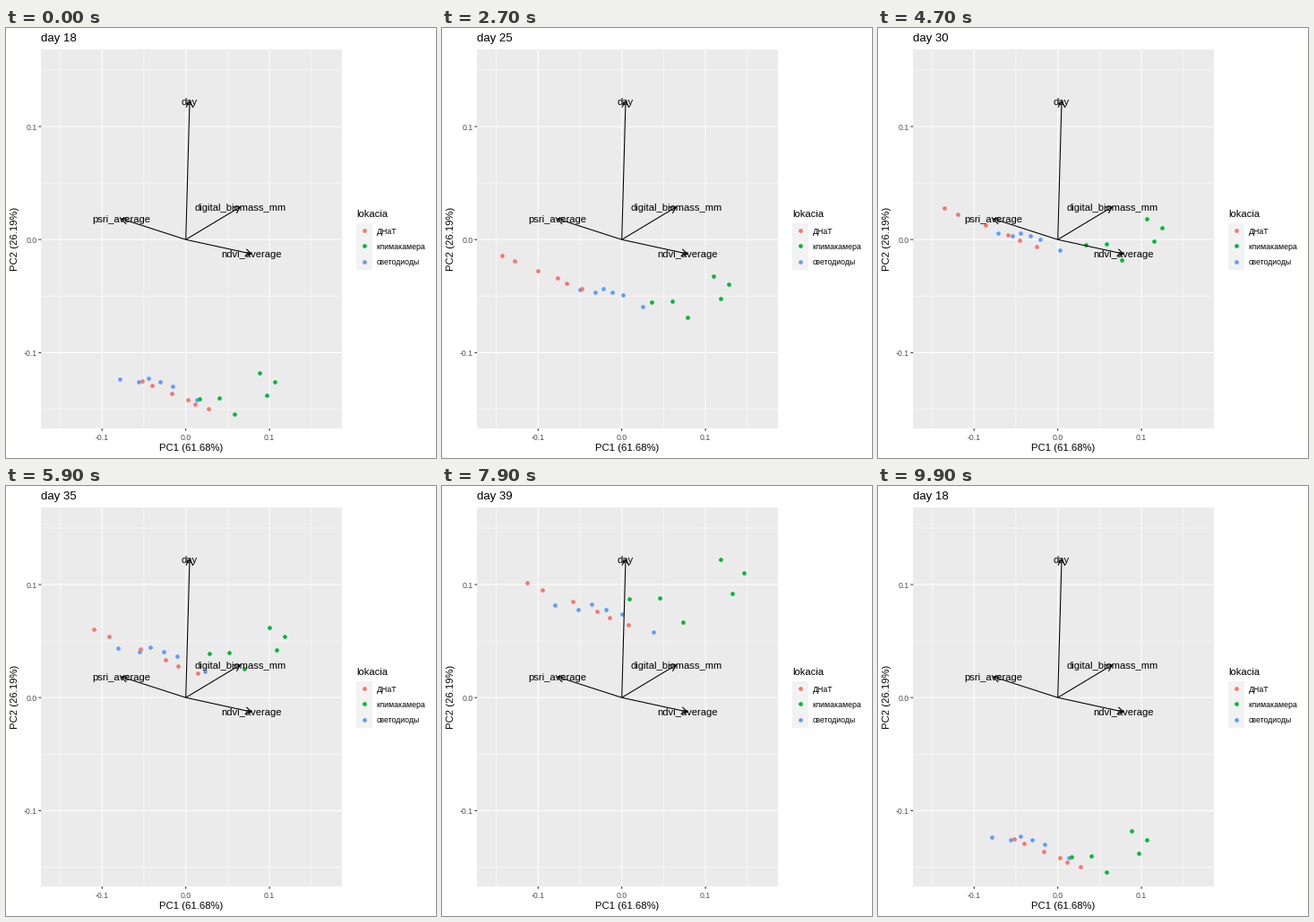
Animation, 480 px wide and 480 px high, one loop 10000 ms. Source, as a matplotlib script:

```python
import numpy as np
import matplotlib.pyplot as plt
from matplotlib.animation import FuncAnimation
from matplotlib.patches import Rectangle

plt.rcParams["font.family"] = "Liberation Sans"

SIZE, DPI = 480, 72  # at 72 dpi one point is one pixel
FRAMES = 100
LEFT, TOP, RIGHT, BOTTOM = 39.2, 24, 375, 447
RED, GREEN, BLUE = "#F8766D", "#00BA38", "#619CFF"
LINE, DOT = 1.07, 22
TEXT, SMALL, TITLE = 11.25, 8.8, 13.2

DAYS = [18, 23, 25, 28, 30, 32, 35, 37, 39, 42]
KEY_DAYS = [18, 23, 26.5, 31, 35, 39, 42]


class Cloud:
    """Six plants in a fixed formation that drifts and widens with the day."""

    def __init__(self, color, z, cx, cy, width, shape_x, shape_y):
        self.path = cx, cy, width
        self.shape = np.column_stack([shape_x, shape_y])
        self.dots = ax.scatter([], [], s=DOT, color=color, lw=0, zorder=z)

    def place(self, day):
        cx, cy, width = (np.interp(day, KEY_DAYS, p) for p in self.path)
        return (cx, cy) + width * self.shape

    def move(self, day, next_day, t):
        a, b = self.place(day), self.place(next_day)
        self.dots.set_offsets(a + (b - a) * t)


fig = plt.figure(figsize=(SIZE / DPI, SIZE / DPI), dpi=DPI, facecolor="white")
ax = fig.add_axes([0, 0, 1, 1])
ax.set_xlim(0, SIZE)
ax.set_ylim(SIZE, 0)
ax.axis("off")


def line(xs, ys, color, width, z):
    ax.plot(xs, ys, color=color, lw=width, zorder=z, snap=False,
            solid_capstyle="butt", solid_joinstyle="round")


def text(x, y, s, size=TEXT, color="black", ha="left", **kw):
    return ax.text(x, y, s, fontsize=size, color=color, ha=ha,
                   va="baseline", zorder=6, **kw)


def box(x, y, w, h, color):
    ax.add_patch(Rectangle((x, y), w, h, fc=color, ec="none", zorder=0))


def px(x):
    return 200.7 + 934 * x


def py(y):
    return 236.2 - 1262 * y


def grid(v, width):
    line([px(v)] * 2, [TOP, BOTTOM], "white", width, 1)
    line([LEFT, RIGHT], [py(v)] * 2, "white", width, 1)


def arrow(x, y, head=8):
    """Line from the origin with an open 30 degree head."""
    x0, y0 = px(0), py(0)
    line([x0, x], [y0, y], "black", LINE, 4)
    angle = np.arctan2(y0 - y, x0 - x) + np.radians([-30, 30])
    hx, hy = x + head * np.cos(angle), y + head * np.sin(angle)
    line([hx[0], x, hx[1]], [hy[0], y, hy[1]], "black", LINE, 4)


# Panel, grid and axes
box(LEFT, TOP, RIGHT - LEFT, BOTTOM - TOP, "#EBEBEB")
for v in (-0.15, -0.05, 0.05, 0.15):
    grid(v, LINE / 2)
for v in (-0.1, 0, 0.1):
    grid(v, LINE)
    line([px(v)] * 2, [BOTTOM, BOTTOM + 2.75], "#333333", LINE, 2)
    line([LEFT - 2.75, LEFT], [py(v)] * 2, "#333333", LINE, 2)
    text(px(v), 459.7, f"{v:.1f}", SMALL, "#4D4D4D", "center")
    text(34.5, py(v) + 3.5, f"{v:.1f}", SMALL, "#4D4D4D", "right")
text((LEFT + RIGHT) / 2 - 0.5, 472.4, "PC1 (61.68%)", ha="center")
text(13.3, (TOP + BOTTOM) / 2, "PC2 (26.19%)", ha="center",
     rotation=90, rotation_mode="anchor")

# Loadings
for x, y, name in [(205, 81.8, "day"), (261.3, 199.8, "digital_biomass_mm"),
                   (128.8, 213, "psri_average"), (274.2, 252.2, "ndvi_average")]:
    arrow(x, y)
    text(x, y + 4.2, name, ha="center")

# Legend
text(391, 211.3, "lokacia")
box(391.2, 217.6, 17.3, 51.9, "#F2F2F2")
for i, (name, color) in enumerate([("ДНаТ", RED), ("климакамера", GREEN),
                                   ("светодиоды", BLUE)]):
    y = 226.2 + 17.28 * i
    ax.scatter([399.8], [y], s=DOT, color=color, lw=0, zorder=3)
    text(413.8, y + 3.3, name, SMALL)

title = text(39.2, 15, "", TITLE)

# Centre and width of each location on the key days, then its formation
clouds = [
    Cloud(RED, 3.2,
          [190, 112, 111, 125, 158, 154, 143],
          [410, 315, 272.5, 222.5, 185.5, 132.5, 97],
          [74, 69, 92, 103, 116, 113, 112],
          [-0.52, -0.37, -0.07, 0.17, 0.29, 0.48],
          [-0.22, -0.15, -0.03, 0.07, 0.13, 0.20]),
    Cloud(BLUE, 3,
          [167.5, 199, 189.5, 162, 171, 177.5, 166],
          [398, 344, 298, 232.5, 188, 141, 105],
          [86, 92, 64, 65, 97, 110, 108],
          [-0.47, -0.23, -0.10, 0.05, 0.21, 0.53],
          [-0.07, -0.03, -0.08, -0.03, 0.02, 0.20]),
    Cloud(GREEN, 3.1,
          [263.5, 285, 283, 281, 274.5, 281.5, 288],
          [408, 349, 300, 236, 181, 117, 80],
          [84, 82, 88, 84, 84, 128, 128],
          [-0.57, -0.30, -0.10, 0.23, 0.43, 0.33],
          [0.07, 0.06, 0.27, -0.27, -0.16, 0.02]),
]


def schedule(i):
    """First and last frame of the move out of state i."""
    end = int(0.99 * FRAMES / len(DAYS) * (i + 1) + 0.5)
    return end - (6 if i else 7), end


MOVES = [schedule(i) for i in range(len(DAYS))]


def update(frame):
    i = sum(frame >= end for _, end in MOVES[:-1])
    start, end = MOVES[i]
    t = np.clip((frame - start) / (end - start), 0, 1)
    day, next_day = DAYS[i], DAYS[(i + 1) % len(DAYS)]
    for cloud in clouds:
        cloud.move(day, next_day, t)
    title.set_text(f"day {next_day if t > 0.5 else day}")
    return [*(cloud.dots for cloud in clouds), title]


anim = FuncAnimation(fig, update, frames=FRAMES, interval=100,
                     repeat=True, repeat_delay=0, blit=False)
plt.show()
```
